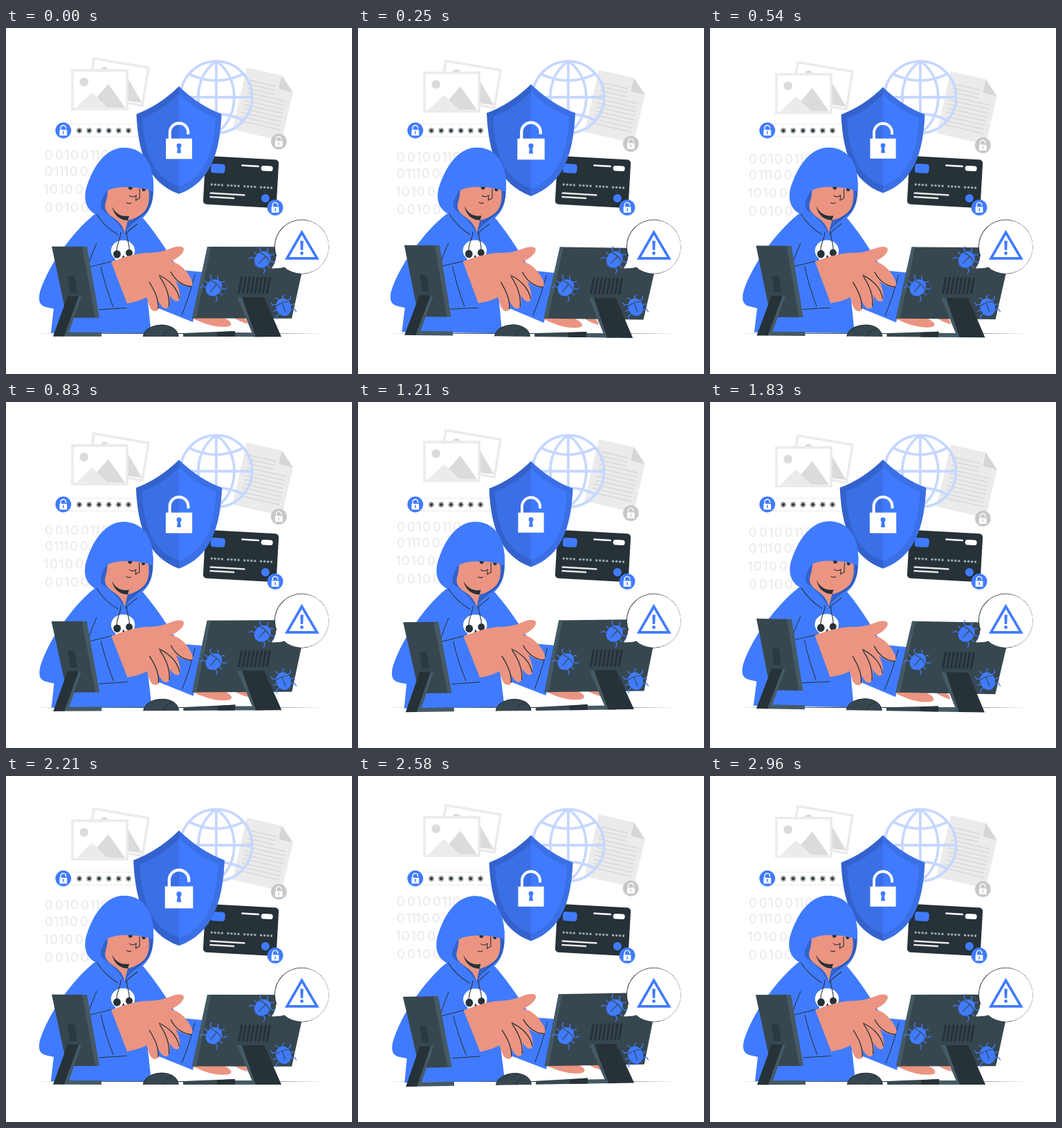
Animation, 500 px wide and 500 px high, one loop 3 s. Source, as an HTML page with a canvas:

```html
<!DOCTYPE html>
<html lang="en">
<head>
<meta charset="utf-8">
<title>Hacker at work</title>
<style>
html, body { margin: 0; width: 100%; height: 100%; overflow: hidden; background: #fff; }
canvas { display: block; width: 500px; height: 500px; }
</style>
</head>
<body>
<canvas id="stage"></canvas>
<script>
const canvas = document.getElementById('stage');
const ctx = canvas.getContext('2d');
const dpr = window.devicePixelRatio || 1;
canvas.width = canvas.height = 500 * dpr;

const BLUE = '#407bff', MID = '#3a6fe6', DEEP = '#3362cc', PALE = '#c6d7ff';
const DARK = '#263238', SLATE = '#37474f', STEEL = '#455a64', SKIN = '#eb9481';
const WHITE = '#fff', LIGHT = '#ebebeb', GREY = '#dbdbdb', BADGE = '#c7c7c7';
const CYCLE = 1500, STEP = 3000 / 72, LEAD = 25;

const paths = {};
const shape = d => paths[d] || (paths[d] = new Path2D(d));

function fill(d, color) {
  ctx.fillStyle = color;
  ctx.fill(shape(d));
}

function line(d, color = DARK, width = 1) {
  ctx.strokeStyle = color;
  ctx.lineWidth = width;
  ctx.stroke(shape(d));
}

function oval(x, y, rx, ry, color) {
  ctx.fillStyle = color;
  ctx.beginPath();
  ctx.ellipse(x, y, rx, ry, 0, 0, Math.PI * 2);
  ctx.fill();
}

const dot = (x, y, r, color) => oval(x, y, r, r, color);

function pill(x, y, w, h, r, color) {
  ctx.fillStyle = color;
  ctx.beginPath();
  ctx.roundRect(x, y, w, h, r);
  ctx.fill();
}

// Runs draw with its own origin, turn (degrees) and scale.
function place(x, y, deg, size, draw) {
  ctx.save();
  ctx.translate(x, y);
  ctx.rotate(deg * Math.PI / 180);
  ctx.scale(size, size);
  draw();
  ctx.restore();
}

function pivot(x, y, deg, draw) {
  place(x, y, deg, 1, () => {
    ctx.translate(-x, -y);
    draw();
  });
}

function lock(hole, bar) {
  line('M-13 0V-11A13 13 0 0 1 13 -11V-8', WHITE, bar);
  fill('M-18.6 -2.2H18.6V26.8H-18.6Z', WHITE);
  dot(0, 8, 3.4, hole);
  fill('M-1.6 8H1.6L3 18.5H-3Z', hole);
}

function badge(x, y, color) {
  dot(x, y, 11.4, color);
  place(x, y - 0.3, 0, 0.29, () => lock(color, 5));
}

function star(x, y, r, color, width) {
  ctx.strokeStyle = color;
  ctx.lineWidth = width;
  ctx.beginPath();
  for (let i = 0; i < 4; i++) {
    const a = i * Math.PI / 4, c = Math.cos(a) * r, s = Math.sin(a) * r;
    ctx.moveTo(x - c, y - s);
    ctx.lineTo(x + c, y + s);
  }
  ctx.stroke();
}

function pictures() {
  const back = 'M127 44L206 57.5L197 112L118 98Z';
  fill(back, WHITE);
  dot(142.5, 62, 6, GREY);
  fill('M171 64L196.5 108L165 104Z', GREY);
  line(back, LIGHT, 3.6);
  const front = 'M95.8 61.3H175V117H95.8Z';
  fill(front, WHITE);
  dot(112.7, 78, 6.3, GREY);
  fill('M148 81L172 115H118Z', GREY);
  fill('M124 93L147 115H102Z', LIGHT);
  line(front, LIGHT, 3.6);
}

function digits() {
  ctx.font = '500 19px Inter, sans-serif';
  ctx.textAlign = 'center';
  ctx.textBaseline = 'alphabetic';
  ctx.fillStyle = LIGHT;
  const rows = [['00100110', 182.5], ['011100', 206], ['10100', 232], ['00100', 258]];
  for (const [bits, y] of rows) {
    let x = 54.5;
    for (const bit of bits) {
      const half = bit === '0' ? 7.5 : 3.5;
      ctx.fillText(bit, x + half, y + 7.5);
      x += half * 2;
    }
  }
}

function sheet() {
  place(348, 57, 13, 1, () => {
    fill('M0 0H52L73 20V92H0Z', LIGHT);
    fill('M52 0L73 20H55Q52 20 52 17Z', '#d6d6d6');
    for (let i = 0; i < 11; i++) {
      const right = i < 3 ? 47 : 66;
      pill(8, 16 + i * 6, right - 8, 2, 0, GREY);
    }
  });
  badge(394.3, 164, BADGE);
}

function password() {
  ctx.fillStyle = WHITE;
  ctx.beginPath();
  ctx.roundRect(74, 139, 140, 18.5, 9);
  ctx.fill();
  ctx.strokeStyle = LIGHT;
  ctx.lineWidth = 1;
  ctx.stroke();
  badge(82.8, 148, BLUE);
  for (let i = 0; i < 6; i++) star(106 + i * 14.2, 148.3, 4.1, DARK, 1.1);
}

function globe() {
  place(303.8, 100, 0, 1, () => {
    ctx.strokeStyle = PALE;
    ctx.lineWidth = 3.8;
    ctx.beginPath();
    ctx.arc(0, 0, 51.8, 0, Math.PI * 2);
    ctx.stroke();
    line('M0 -52V52M-52 0H52', PALE, 3.8);
    line('M0 -52C-18 -40 -26 -20 -26 0S-18 40 0 52C18 40 26 20 26 0S18 -40 0 -52', PALE, 3.8);
    line('M-40 -34Q0 -14 40 -34M-40 34Q0 14 40 34', PALE, 3.8);
  });
}

function card() {
  place(339.5, 222.5, 3.2, 1, () => {
    pill(-53, -35, 106, 70, 5, DARK);
    pill(-44.5, -24.3, 20.5, 13.4, 4, BLUE);
    pill(-0.5, -25.2, 25.5, 2.5, 0.5, WHITE);
    pill(28, -25.4, 17, 7.6, 3.6, WHITE);
    for (let i = 0; i < 16; i++) {
      star(-42 + (i >> 2) * 23.8 + (i & 3) * 5, 6, 1.9, '#d5d9db', 0.6);
    }
    pill(-44, 17.3, 51, 2.5, 0.5, '#e6e6e6');
    pill(-44, 22.7, 36, 2.5, 0.5, '#e6e6e6');
    dot(36.6, 21.4, 6, BLUE);
  });
  badge(389, 259.4, BLUE);
}

function shield(size) {
  place(250, 162, 0, size, () => {
    fill('M0 -76.4Q-28 -49 -60.5 -37C-58 18 -45 60 0 76.5Z', DEEP);
    fill('M0 -76.4Q28 -49 60.5 -37C58 18 45 60 0 76.5Z', MID);
    fill('M0 -66Q-24 -42 -52 -32C-50 16 -38 52 0 66Z', MID);
    fill('M0 -66Q24 -42 52 -32C50 16 38 52 0 66Z', BLUE);
    lock(BLUE, 4);
  });
}

function body() {
  fill('M198 285L232 328L255 350L288 353L270 425L218 404Z', BLUE);
  line('M273 356Q265 388 254 415');
  fill('M131 267C117 277 100 295 86 314C70 334 55 362 49 382C46 396 49 402 60 404L69 406L65 441H210L205 395L250 350C233 322 214 292 192 268Z', BLUE);
  line('M131 311Q123 328 118 346L153 337.5M134 407L175 404.5M137 345Q144 375 155 403');
}

function skull() {
  oval(169, 322, 17.2, 15.2, WHITE);
  fill('M158 330H180V341H158Z', WHITE);
  oval(160.5, 327, 5.4, 5.8, DARK);
  oval(178, 325, 5, 5.2, DARK);
  fill('M169.5 328L172.5 333H167.5Z', DARK);
  line('M166 293C166 306 160 310 160 322M174 293C174 306 179 312 178 321', DARK, 1.1);
}

function head() {
  fill('M131 270C118 264 112 252 115 235C121 212 138 174 170 173C196 173 212 192 213 226C214 252 208 264 199 273C188 282 178 288 172 298C160 292 145 282 131 270Z', BLUE);
  fill('M146 234C139 246 134 256 139 263C150 270 165 284 170 296C175 285 195 275 203 266C209 258 212 246 211 234Z', DEEP);
  fill('M147 229L206 231C208 249 206 261 197 268C188 275 181 277 176 278L171.5 296Q168 282 155 274C146 268 141 262 144 252Q147 244 147 229Z', SKIN);
  fill('M153 258C159 270 168 273 178 271.5L176 278C165 278 156 271 153 258Z', DARK);
  oval(179.7, 230, 3, 3.8, DARK);
  oval(199, 232, 2.6, 4, DARK);
  line('M193 232V246L187.5 249L188 242Q183 246 178 242', DARK, 1.1);
  line('M174 252Q177 255 181 252.5', DARK, 1.1);
  fill('M144 237C155 228 187 227 212 236L213 226C212 192 196 173 170 173C150 173 135 190 126 207L130 246Z', BLUE);
  line('M211 236C212 251 207 261 198 269C189 276 177 284 172 295', DARK, 0.6);
  line('M131 269C139 282 150 292 162 299M190 283Q179 291 172 298', DARK, 1);
}

function hand() {
  fill('M152 338C170 331 190 325 205 325C222 325 232 321 242 317C250 315 257 315 257 320C256 327 246 334 238 337C248 339 257 346 263 355C268 362 271 369 269 372C265 376 257 373 245 366C251 376 252 387 251 391C249 397 243 397 236 385C238 394 237 400 235 403C231 408 225 405 219 392C222 402 221 406 219 408C214 411 209 407 207 401L203 389C195 394 185 396 175 398Z', SKIN);
  line('M238 352C244 364 255 373 268 373.5M221 357C236 364 248 376 250.5 391M222 359C231 372 237 386 235.5 402M207 367C215 380 221 392 220 406', DARK, 1.3);
}

function farHand() {
  fill('M269 419C284 427 305 434 322 431C330 428 323 422 312 417H275Z', SKIN);
  fill('M330 417L345 419Q349 423 349 427Q340 425 330 419Z', SKIN);
}

function hacker() {
  body();
  skull();
  head();
  hand();
  farHand();
}

function devices() {
  // left screen
  fill('M66 316H111L130 419H88Z', SLATE);
  fill('M110 316H117L135 419H129Z', STEEL);
  fill('M89 359H99L103 383H93Z', '#2b3940');
  fill('M103 388H109L91 440H138V446H82Z', STEEL);
  fill('M89 388H105L84 446H68Z', DARK);

  // right screen
  fill('M291 316H435.5L413 419.5H269Z', SLATE);
  fill('M291 316H296L275 419.5H269Z', STEEL);
  for (let i = 0; i < 8; i++) {
    place(339 + i * 5.8, 359.5, 0, 1, () => fill('M0 0H3.4L-0.8 24H-4.2Z', DARK));
  }
  fill('M331 440H362V446H331Z', STEEL);
  fill('M334 389H345L372 446H358Z', STEEL);
  fill('M341 389H373L398 446H361Z', DARK);

  // keyboard and mouse
  fill('M256 441L331 438V446H256Z', SLATE);
  fill('M305 439.5L331 438V446H305Z', DARK);
  fill('M198 446C200 433 217 428 229 429C242 431 249 438 249.5 446Z', SLATE);
  line('M198.5 446C200 433 217 428.5 229 429.5C242 431 249 438 249 446M240 434Q229 438 228 446', DARK, 1);
}

function bug(x, y, deg) {
  place(x, y, deg, 1, () => {
    for (const side of [-1, 1]) {
      ctx.save();
      ctx.scale(side, 1);
      line('M8 -6L14 -8L15 -12M10 1H16.5M8 7L14 9L15 13.5M3 -11L4 -14.5L7 -16.5', BLUE, 1.3);
      ctx.restore();
    }
    oval(0, 0.3, 10.8, 12.9, BLUE);
    line('M-9.5 -4.5Q0 -8 9.5 -4.5M0 -6V8', SLATE, 1.2);
  });
}

function alertBubble() {
  fill('M391 330Q390 340 384 347Q395 348 408 344Z', WHITE);
  // offset discs leave a rim that thins to the right
  dot(427.2, 316.2, 39.4, DARK);
  dot(427.6, 316.2, 38.8, WHITE);
  fill('M390.5 329Q390 340 384 347Q395 348 407 344Z', WHITE);
  line('M427.5 295.5L406 332.8H449.5Z', BLUE, 3.7);
  fill('M425.2 307.5H429.8L429.2 321H425.8Z', BLUE);
  dot(427.5, 325.5, 2.4, BLUE);
}

// Piecewise linear beat: two pulses in each cycle.
function beat(p) {
  const keys = [[0, 1], [0.1, 1.1], [0.3, 1], [0.4, 1], [0.5, 1.1], [0.6, 1], [1, 1]];
  const i = keys.findIndex(k => k[0] > p);
  const [a, from] = keys[i - 1], [b, to] = keys[i];
  return from + (to - from) * (p - a) / (b - a);
}

function sway(p) {
  if (p < 0.25) return p * 4;
  return p < 0.75 ? 2 - p * 4 : p * 4 - 4;
}

// Ten pixels up and back, a third of a cycle late.
function hover(p) {
  const q = (p + 2 / 3) % 1;
  return 6.4 - 20 * Math.min(q, 1 - q);
}

function render(time) {
  const held = Math.floor((time + 4) / STEP) * STEP;
  const p = ((held + LEAD) % CYCLE) / CYCLE;
  const tilt = sway(p);

  ctx.setTransform(dpr, 0, 0, dpr, 0, 0);
  ctx.fillStyle = WHITE;
  ctx.fillRect(0, 0, 500, 500);

  place(0, hover(p), 0, 1, () => {
    pictures();
    digits();
    sheet();
  });
  password();
  globe();
  card();
  shield(beat(p));
  fill('M42 441.5Q250 440.4 457 441.5Q250 442.6 42 441.5Z', DARK);
  pivot(199, 308, tilt, hacker);
  pivot(247, 381, tilt, devices);
  bug(300.5, 375, 40);
  bug(371, 334.5, 45);
  bug(401, 403, -20);
  alertBubble();
}

let start;
function tick(now) {
  if (start === undefined) start = now;
  render((now - start) % 3000);
  requestAnimationFrame(tick);
}
render(0);
requestAnimationFrame(tick);
</script>
</body>
</html>
```
